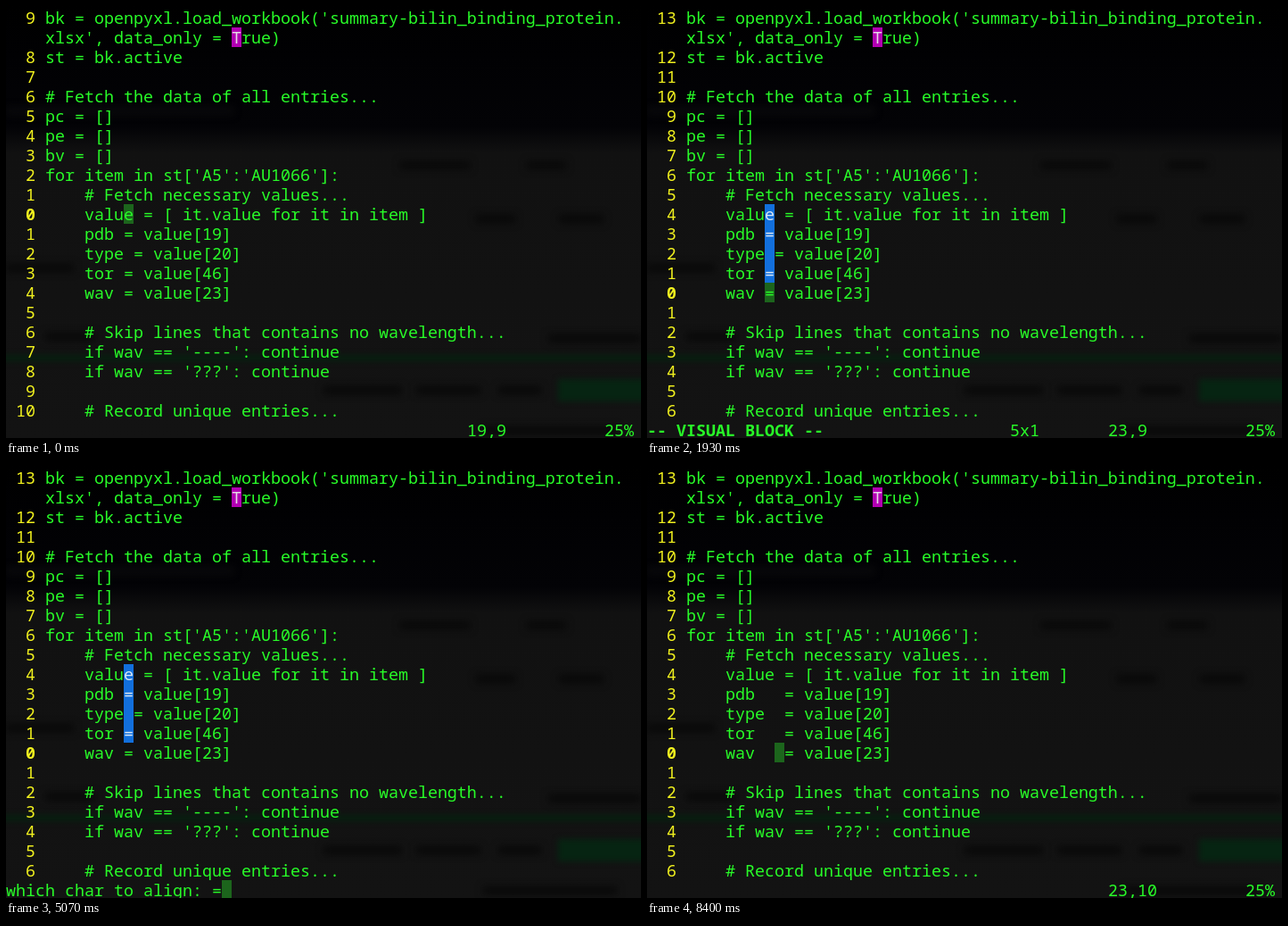
An HTML page with a canvas that plays this animation: 712 by 484 pixels, repeating every 8470 ms.

```html
<!DOCTYPE html>
<html>
<head>
<meta charset="utf-8">
<style>
html, body { margin: 0; width: 712px; height: 484px; overflow: hidden; background: #000; }
canvas { display: block; }
</style>
</head>
<body>
<canvas id="stage" width="712" height="484"></canvas>
<script>
const ctx = document.getElementById('stage').getContext('2d');
const LOOP = 8470, CELL = 11, ROW = 22, TOP = 10;
const GREEN = '#28fc28', YELLOW = '#f2f21e', BLUE = '#126fdc', CURSOR = '#1c651c';

const code = [
  "bk = openpyxl.load_workbook('summary-bilin_binding_protein.",
  "xlsx', data_only = True)",
  "st = bk.active",
  "",
  "# Fetch the data of all entries...",
  "pc = []",
  "pe = []",
  "bv = []",
  "for item in st['A5':'AU1066']:",
  "    # Fetch necessary values...",
  "    value = [ it.value for it in item ]",
  "    pdb = value[19]",
  "    type = value[20]",
  "    tor = value[46]",
  "    wav = value[23]",
  "",
  "    # Skip lines that contains no wavelength...",
  "    if wav == '----': continue",
  "    if wav == '???': continue",
  "",
  "    # Record unique entries..."
];

// Editor states: start time, current line, and what the bottom row shows.
const block = (at, line, cmd) => ({ at, line, select: true, cmd });
const ask = (at, prompt, caret) => ({ at, line: 23, select: true, prompt, caret });
const QUESTION = 'which char to align: ';
const states = [
  { at: 0, line: 19 },
  block(400, 19, '1x1'),
  block(730, 20, '2x1'),
  block(1000, 21, '3x1'),
  block(1470, 22, '4x1'),
  block(1900, 23, '5x1'),
  block(2800, 23, '['),
  ask(3270, QUESTION, 21),
  ask(4470, QUESTION + '=', 22),
  ask(5800, QUESTION + '=', 0),
  { at: 6470, line: 23, aligned: true }
];

function text(str, col, row, color = GREEN, weight = 500) {
  ctx.font = `${weight} 18.3333px "Noto Sans Mono", "DejaVu Sans Mono", monospace`;
  ctx.fillStyle = color;
  ctx.fillText(str, col * CELL, row * ROW + 20);
}

function cell(col, row, fill, char = '', color = GREEN) {
  ctx.fillStyle = fill;
  ctx.fillRect(col * CELL, row * ROW + 2, CELL, ROW);
  text(char, col, row, color);
}

function blur(x, y, w, h, color, radius = 4) {
  ctx.filter = `blur(${radius}px)`;
  ctx.fillStyle = color;
  ctx.fillRect(x, y, w, h);
  ctx.filter = 'none';
}

// Faint window showing through the terminal.
function backdrop() {
  const shade = ctx.createLinearGradient(0, 0, 0, 484);
  [[0, '#000'], [0.12, '#010103'], [0.28, '#030306'], [0.34, '#111'], [1, '#131313']]
    .forEach(([stop, color]) => shade.addColorStop(stop, color));
  ctx.fillStyle = shade;
  ctx.fillRect(0, 0, 712, 484);
  blur(0, 113, 255, 9, '#09090b');
  [[442, 174, 78], [584, 174, 44], [527, 234, 44], [620, 234, 50], [0, 289, 76],
   [44, 366, 56], [608, 368, 104], [356, 426, 88], [460, 426, 72], [552, 426, 48], [535, 471, 150]]
    .forEach(([x, y, w]) => blur(x, y, w, 9, '#080808'));
  blur(-10, 391, 732, 7, '#06200f', 3);
  blur(619, 418, 103, 25, '#062412', 3);
}

function draw({ line, select, cmd, prompt, caret, aligned }) {
  const cursorRow = line - 9;
  const lines = code.map((s, row) =>
    aligned && row > 10 && row < 15
      ? s.replace(/^ +(\w+) /, (_, name) => '    ' + name.padEnd(6))
      : s);

  backdrop();
  lines.forEach((s, row) => {
    text(s, 4, row);
    if (row === 1) return;
    const offset = Math.abs((row ? row + 9 : 10) - line);
    text(String(offset).padStart(2), 1, row, YELLOW, offset ? 500 : 700);
  });
  cell(23, 1, '#b300b3', 'T', '#e6d8e6');

  const col = aligned ? 13 : 12;
  if (select)
    for (let row = TOP; row < cursorRow; row++)
      cell(col, row, BLUE, lines[row][col - 4], '#dce8f4');

  if (prompt) {
    text(prompt, 0, 21);
    cell(caret, 21, CURSOR, prompt[caret]);
    return;
  }
  cell(col, cursorRow, CURSOR, lines[cursorRow][col - 4]);
  if (select) text('-- VISUAL BLOCK --', 0, 21, GREEN, 700);
  if (cmd) text(cmd, 37, 21);
  text(`${line},${col - 3}`, 47, 21);
  text('25%', 61, 21);
}

let shown;
function tick(now) {
  const t = now % LOOP;
  const state = states.findLast(s => s.at <= t);
  if (state !== shown) draw(shown = state);
  requestAnimationFrame(tick);
}
requestAnimationFrame(tick);
</script>
</body>
</html>
```
